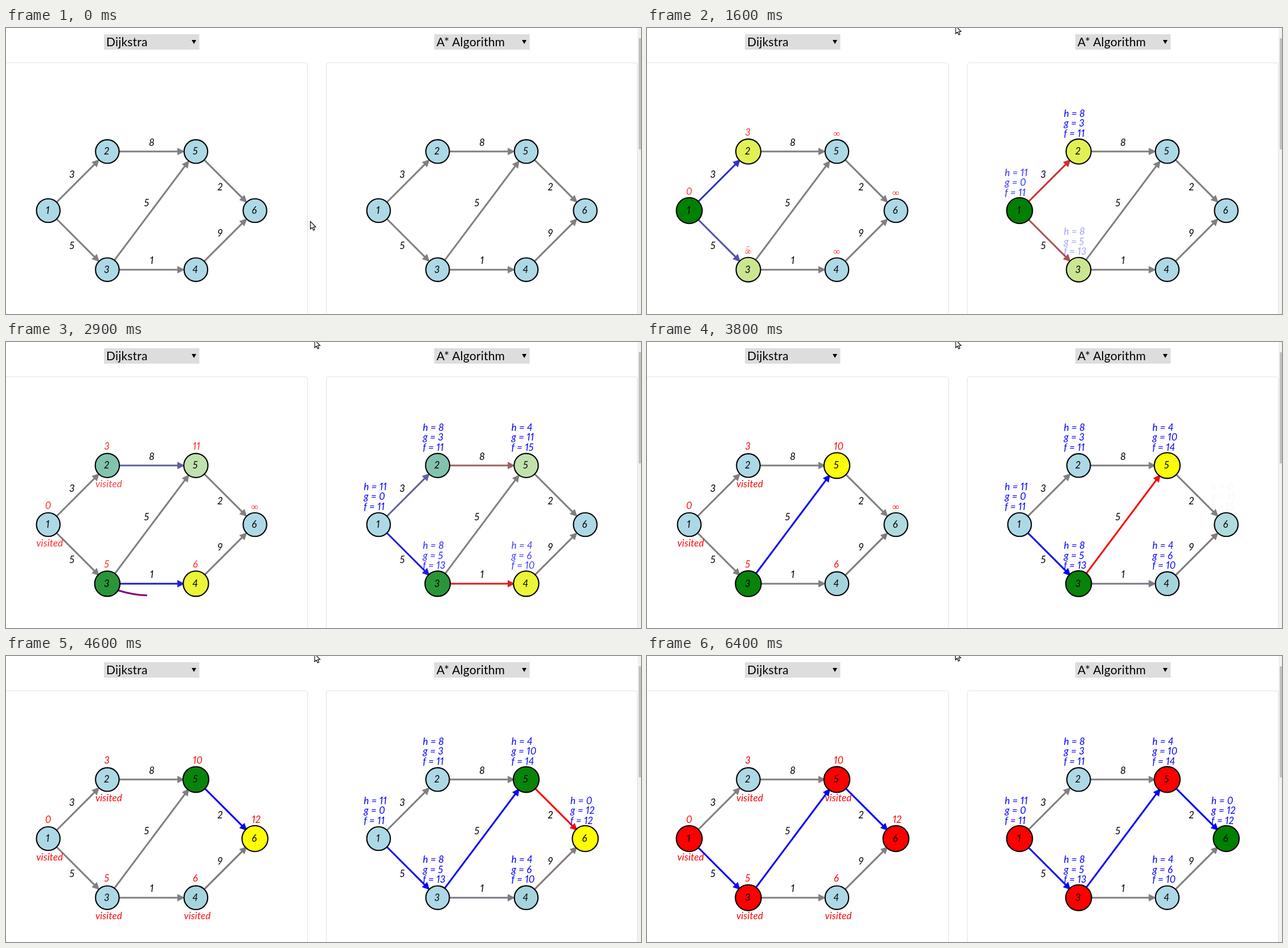
Animation of 1115 by 502 pixels, one loop 6.6 s. Source, as an HTML page:

```html
<!DOCTYPE html>
<html lang="en">
<head>
<meta charset="utf-8">
<title>Shortest path comparison</title>
<style>
html, body { margin: 0; width: 100%; height: 100%; overflow: hidden; background: #fff; }
svg { display: block; }
text { font: italic 17px Lato, "Open Sans", sans-serif; font-variant-numeric: proportional-nums; letter-spacing: .2px; }
.mid { text-anchor: middle; }
.pick { font-size: 21px; font-style: normal; }
.red { fill: #f00; }
.blue { fill: #00f; }
.inf { font: 17px "Liberation Serif", serif; text-anchor: middle; }
</style>
</head>
<body>
<svg width="1115" height="502" viewBox="0 0 1115 502">
  <g fill="none" stroke="#e2e2e2">
    <rect x="-20" y="61" width="549.5" height="480" rx="4"/>
    <rect x="562.5" y="61" width="546" height="480" rx="4"/>
  </g>
  <rect x="1109" width="6" height="502" fill="#f1f1f1"/>
  <rect x="1111" y="18" width="4" height="195" fill="#c1c1c1"/>
  <g id="dijkstra"></g>
  <g id="astar" transform="translate(580)"></g>
  <path id="cursor" d="M.5 .5V14L3.6 11.2 5.8 16 8 15 5.9 10.3H10Z" fill="#fff" stroke="#000" stroke-width="1.1"/>
</svg>
<script>
const LOOP = 6600, STEP = 560;
const GRAY = [128, 128, 128], IDLE = [173, 216, 230], GREEN = [0, 128, 0],
      YELLOW = [255, 255, 0], RED = [255, 0, 0], BLUE = [0, 0, 255];

const nodes = {
  1: [74.2, 320.5], 2: [177.9, 216.8], 3: [177.9, 424.2],
  4: [333.4, 424.2], 5: [333.4, 216.8], 6: [437.1, 320.5]
};
const ids = Object.keys(nodes).map(Number);
const heuristic = { 1: 11, 2: 8, 3: 8, 4: 4, 5: 4, 6: 0 };

// from, to, weight, label centre
const edges = [
  [1, 2, 3, 116, 257], [1, 3, 5, 116, 382], [2, 5, 8, 256, 201], [3, 5, 5, 247, 307],
  [3, 4, 1, 256, 408], [5, 6, 2, 376, 279], [4, 6, 9, 376, 360]
];

// start time, current node, relaxed node, its new distance
const steps = [
  [227, 1, 1, 0], [787, 1, 2, 3], [1347, 1, 3, 5], [1907, 2, 5, 11], [2560, 3, 4, 6],
  [3128, 3, 5, 10], [3700, 4, 6, 15], [4165, 5, 6, 12], [4720, 6, 6, 12], [5270, 0, 0, 0]
];
const trails = { 2: "12", 3: "13", 4: "13 34", 5: "13 35", 6: "13 35 56" };
const PATH = trails[6];

const clamp = x => Math.min(1, Math.max(0, x));
const ease = x => x < .5 ? 4 * x ** 3 : 1 - 4 * (1 - x) ** 3;
const mix = (a, b, p) => a + (b - a) * p;
const blend = (a, b, p) => `rgb(${a.map((v, i) => Math.round(mix(v, b[i], p)))})`;
const text = (x, y, s, cls) => `<text x="${x}" y="${y}" class="${cls}">${s}</text>`;

function label(star, id, dist, visited) {
  const [x, y] = nodes[id];
  if (star) return dist === undefined ? "" :
    [`h = ${heuristic[id]}`, `g = ${dist}`, `f = ${heuristic[id] + dist}`]
      .map((s, i) => text(x - 26, y - 61 + i * 17.5, s, "blue")).join("");
  return (dist === undefined ? text(x, y - 26, "∞", "inf red") : text(x - 5.5, y - 28, dist, "red")) +
    (visited ? text(x - 21, y + 38, "visited", "red") : "");
}

// Colours and labels once the first `count` steps are done
function stateAfter(star, count) {
  const fill = {}, stroke = {}, labels = {}, dist = {}, seen = new Set();
  ids.forEach(id => fill[id] = IDLE);
  if (!count) return { fill, stroke, labels };
  const [, cur, target] = steps[count - 1];
  steps.slice(0, count).forEach(([, c, to, d]) => {
    if (to) dist[to] = d;
    if (c) seen.add(c);
  });
  seen.delete(cur || 6);
  const solved = count > (star ? 8 : 9);
  if (solved) {
    [1, 3, 5, 6].forEach(id => fill[id] = RED);
    if (star) fill[6] = GREEN;
  } else {
    fill[target] = YELLOW;
    fill[cur] = GREEN;
  }
  const trail = solved ? PATH : star ? trails[cur] || "" : "";
  trail.split(" ").forEach(key => stroke[key] = BLUE);
  if (!solved) stroke[`${cur}${target}`] = star ? RED : BLUE;
  ids.forEach(id => labels[id] = label(star, id, dist[id], seen.has(id)));
  return { fill, stroke, labels };
}

const states = [false, true].map(star =>
  Array.from({ length: steps.length + 1 }, (_, k) => stateAfter(star, k)));

function drawEdge([from, to, weight, lx, ly], color) {
  const [x1, y1] = nodes[from], [x2, y2] = nodes[to];
  const len = Math.hypot(x2 - x1, y2 - y1);
  const angle = Math.atan2(y2 - y1, x2 - x1) * 180 / Math.PI;
  const tip = len - 19.5;
  return `<g transform="translate(${x1} ${y1}) rotate(${angle})">
    <path d="M0 0H${tip - 10}" stroke="${color}" stroke-width="3.1"/>
    <path d="M${tip} 0l-13 -6.5v13z" fill="${color}"/></g>` + text(lx, ly + 6, weight, "mid");
}

function drawGraph(star, count, p, t) {
  const a = states[+star][Math.max(0, count - 1)], b = states[+star][count];
  const [, cur, target] = steps[count - 1] || [];
  let out = edges.map(e => {
    const key = `${e[0]}${e[1]}`;
    return drawEdge(e, blend(a.stroke[key] || GRAY, b.stroke[key] || GRAY, p));
  }).join("");

  if (!star && t > 2740 && t < 3128) {
    const grown = clamp((t - 2740) / 365) * 100;
    out += `<path d="M197 436Q255 454 313 436" pathLength="100" stroke-dasharray="${grown} 200"
      fill="none" stroke="purple" stroke-width="3"/>`;
  }

  ids.forEach(id => {
    const [x, y] = nodes[id], size = s => s.fill[id] === IDLE ? 20.7 : 22.7;
    out += `<circle cx="${x}" cy="${y}" r="${mix(size(a), size(b), p)}" fill="${blend(a.fill[id], b.fill[id], p)}"
      stroke="#000" stroke-width="2.1"/>` + text(x - 1, y + 5.5, id, "mid");
  });

  ids.forEach(id => {
    const before = a.labels[id] || "", after = b.labels[id] || "";
    const fades = !star || before !== after || id === cur || id === target;
    out += fades ? `<g opacity="${1 - p}">${before}</g><g opacity="${p}">${after}</g>` : after;
  });
  return out;
}

const picker = (x, name) => `<rect x="${x}" y="11" width="167.5" height="27" fill="#ddd"/>
  ${text(x + 4, 32, name, "pick")}<path d="M${x + 154} 21h8l-4 7z"/>`;

function cursorAt(t) {
  if (t >= 6400) return [541, -7];
  if (t >= 6200) return [541, -6];
  if (t >= 6100) return [541, -5];
  if (t >= 1600) return [541.5, -4];
  const p = clamp((t - 1000) / 500);
  return [mix(534, 541, p), mix(339, 16, p)];
}

const heads = [picker(172, "Dijkstra"), picker(172, "A* Algorithm")];
const panels = ["dijkstra", "astar"].map(id => document.getElementById(id));
const cursor = document.getElementById("cursor");
let shown = -1;

function frame(now) {
  const t = Math.floor(now % LOOP / 100) * 100;
  if (t !== shown) {
    shown = t;
    const count = steps.filter(s => s[0] <= t).length;
    const start = count ? steps[count - 1][0] : 0;
    const next = count < steps.length && count ? steps[count][0] : LOOP;
    const p = count ? ease(clamp((t - start) / Math.min(STEP, next - start))) : 0;
    panels.forEach((panel, i) => panel.innerHTML = heads[i] + drawGraph(!!i, count, p, t));
    cursor.setAttribute("transform", `translate(${cursorAt(t)})`);
  }
  requestAnimationFrame(frame);
}
requestAnimationFrame(frame);
</script>
</body>
</html>
```
